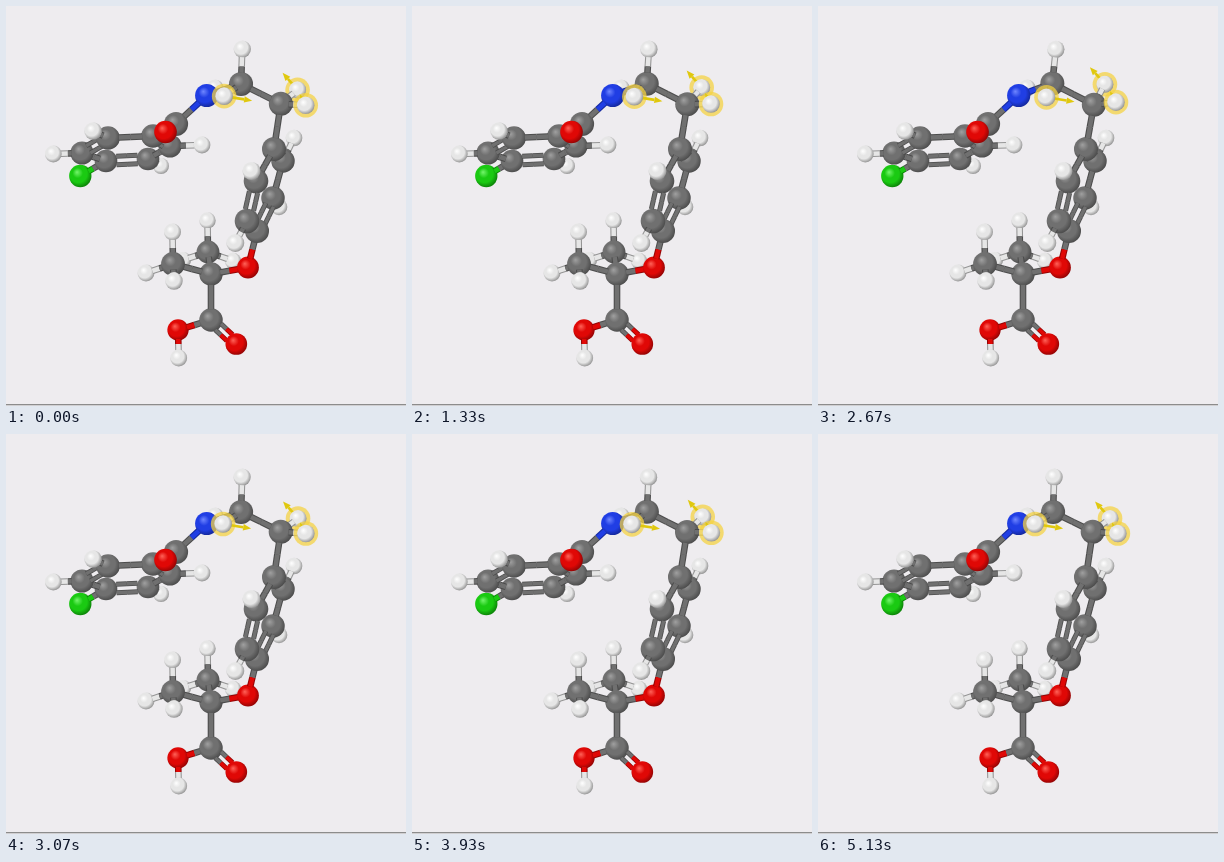
An HTML page with a canvas for the animation above (5200 ms loop, 400 px wide and 400 px high).

```html
<!DOCTYPE html>
<html lang="en">
<head>
<meta charset="utf-8">
<title>Molecular vibration</title>
<style>
  html, body { margin: 0; width: 100%; height: 100%; overflow: hidden; background: #eeecef; }
  canvas { display: block; }
</style>
</head>
<body>
<canvas id="stage" width="400" height="400"></canvas>
<script>
const ctx = document.getElementById('stage').getContext('2d');
const LOOP = 5200, STEP = 1000 / 15, PERIOD = 1000;

// radius, then highlight, body and edge colours
const elements = {
  C: [11.8, '#a0a0a0', '#707070', '#4c4c4c'],
  H: [8.5, '#ffffff', '#e6e6e6', '#949494'],
  O: [10.8, '#ff6258', '#e00806', '#940404'],
  N: [11.3, '#6f86ff', '#203ee4', '#14289c'],
  Cl: [11.7, '#74f56c', '#1aca12', '#0c8408']
};

const atoms = [], bonds = [];

function bond(a, b, order = 1) {
  bonds.push({ a, b, order });
}

function atom(el, x, y, z, parent, order) {
  const a = { el, x0: x, y0: y, z, dx: 0, dy: 0, r: elements[el][0] * (1 + (z - 30) / 1600) };
  atoms.push(a);
  if (parent) bond(parent, a, order);
  return a;
}

function ring(points) {
  const r = points.map(p => atom('C', ...p));
  r.forEach((a, i) => bond(a, r[(i + 1) % 6], i % 2 ? 1 : 2));
  return r;
}

function move(a, dx, dy, marked) {
  Object.assign(a, { dx, dy, marked });
}

// chlorinated ring
const left = ring([[142, 153, -32], [100, 155, -32], [76, 147, 0],
                   [102, 132, 32], [147, 130, 32], [164, 140, 0]]);
atom('Cl', 74.3, 170, -45, left[1]);
atom('H', 155, 160, -62, left[0]);
atom('H', 47.3, 148, 8, left[2]);
atom('H', 87, 125, 61, left[3]);
atom('H', 196, 139, 8, left[5]);

// amide and ethyl chain
const carbonyl = atom('C', 170, 118, 72, left[4]);
atom('O', 159.5, 126, 107, carbonyl, 2);
const nitrogen = atom('N', 200.7, 89.5, 72, carbonyl);
atom('H', 209, 82, 42, nitrogen);
const c2 = atom('C', 234.7, 77.7, 60, nitrogen);
const c1 = atom('C', 275.3, 98.3, 60, c2);
move(c2, -0.4, -0.3);
move(c1, 0.6, 0.6);
move(atom('H', 237, 43.2, 60, c2), 0.9, 0.1);
move(atom('H', 223, 90.7, 95, c2), 6, 0.7, [28, 4.5]);
move(atom('H', 289.4, 81.2, 35, c1), -2.7, -3.3, [-15, -17]);
move(atom('H', 298.9, 97.8, 85, c1), -1, -1.8, [-6, -11]);

// lower ring
const low = ring([[268, 143, 60], [277, 155, 23], [267, 192, 23],
                  [251, 225, 60], [241, 215, 97], [250, 175, 97]]);
bond(c1, low[0]);
atom('H', 288, 132, 0, low[1]);
atom('H', 273, 201, -8, low[2]);
atom('H', 229.3, 237, 120, low[4]);
atom('H', 245.5, 165, 128, low[5]);

// ether, two methyls and acid group
const ether = atom('O', 242, 261.5, 42, low[3]);
const centre = atom('C', 205, 268, 20, ether);
const m1 = atom('C', 167, 258, 42, centre);
atom('H', 166.5, 226, 35, m1);
atom('H', 140, 267, 25, m1);
atom('H', 168, 275, 71, m1);
const m2 = atom('C', 202, 246, -20, centre);
atom('H', 201.5, 214.5, -25, m2);
atom('H', 227, 255, -40, m2);
atom('H', 177, 254, -42, m2);
const acid = atom('C', 205, 314, 20, centre);
atom('O', 230.3, 338, 35, acid, 2);
const hydroxyl = atom('O', 172, 324, 8, acid);
atom('H', 172.7, 352, 20, hydroxyl);

function line(x1, y1, x2, y2, color, width) {
  ctx.strokeStyle = color;
  ctx.lineWidth = width;
  ctx.beginPath();
  ctx.moveTo(x1, y1);
  ctx.lineTo(x2, y2);
  ctx.stroke();
}

function disc(x, y, r, fill) {
  ctx.fillStyle = fill;
  ctx.beginPath();
  ctx.arc(x, y, r, 0, 2 * Math.PI);
  ctx.fill();
}

function drawAtom({ el, x, y, r }) {
  const [, light, body, edge] = elements[el];
  const g = ctx.createRadialGradient(x - r * 0.3, y - r * 0.35, 0, x - r * 0.12, y - r * 0.14, r * 1.16);
  g.addColorStop(0, light);
  g.addColorStop(0.4, body);
  g.addColorStop(0.68, body);
  g.addColorStop(1, edge);
  disc(x, y, r, g);
}

function drawBond({ a, b, order }) {
  const [back, front] = a.z < b.z ? [a, b] : [b, a];
  const dx = front.x - back.x, dy = front.y - back.y;
  const flat = Math.hypot(dx, dy), length = Math.hypot(flat, front.z - back.z);
  // the rod runs between the surfaces of the two spheres
  const start = back.r * 0.92 / length, end = 1 - front.r * 0.92 / length;
  const width = order === 2 ? 5 : 6.6;
  for (const side of order === 2 ? [-4.2, 4.2] : [0]) {
    const ox = back.x - dy / flat * side, oy = back.y + dx / flat * side;
    const part = (from, to, el) => {
      const [, , body, edge] = elements[el];
      const ends = [ox + dx * from, oy + dy * from, ox + dx * to, oy + dy * to];
      line(...ends, edge, width);
      line(...ends, body, width * 0.68);
    };
    part(start, 0.5, back.el);
    part(0.5, end, front.el);
  }
}

function drawMark({ x, y, marked: [vx, vy] }) {
  disc(x, y, 12.3, 'rgba(244, 210, 66, 0.74)');
  const n = Math.hypot(vx, vy), ux = vx / n, uy = vy / n;
  const tx = x + vx, ty = y + vy, bx = tx - ux * 8, by = ty - uy * 8;
  line(x, y, bx, by, '#e0c80e', 2.6);
  ctx.fillStyle = '#e0c80e';
  ctx.beginPath();
  ctx.moveTo(tx, ty);
  ctx.lineTo(bx - uy * 3.2, by + ux * 3.2);
  ctx.lineTo(bx + uy * 3.2, by - ux * 3.2);
  ctx.fill();
}

const scene = [
  ...atoms.map(a => ({ z: a.z, draw: () => drawAtom(a) })),
  ...bonds.map(b => ({ z: Math.min(b.a.z, b.b.z) + 0.1, draw: () => drawBond(b) })),
  ...atoms.filter(a => a.marked).map(a => ({ z: a.z - 0.1, draw: () => drawMark(a) }))
].sort((p, q) => p.z - q.z);

function render(time) {
  const t = Math.floor((time % LOOP + 3.4) / STEP) * STEP;
  const swing = -Math.cos(2 * Math.PI * (t / PERIOD - 0.1));
  for (const a of atoms) {
    a.x = a.x0 + a.dx * swing;
    a.y = a.y0 + a.dy * swing;
  }
  ctx.fillStyle = '#eeecef';
  ctx.fillRect(0, 0, 400, 400);
  ctx.fillStyle = '#8c8c8c';
  ctx.fillRect(0, 398, 400, 1.3);
  scene.forEach(item => item.draw());
}

const begin = performance.now();
function tick() {
  render(performance.now() - begin);
  requestAnimationFrame(tick);
}
tick();
</script>
</body>
</html>
```
